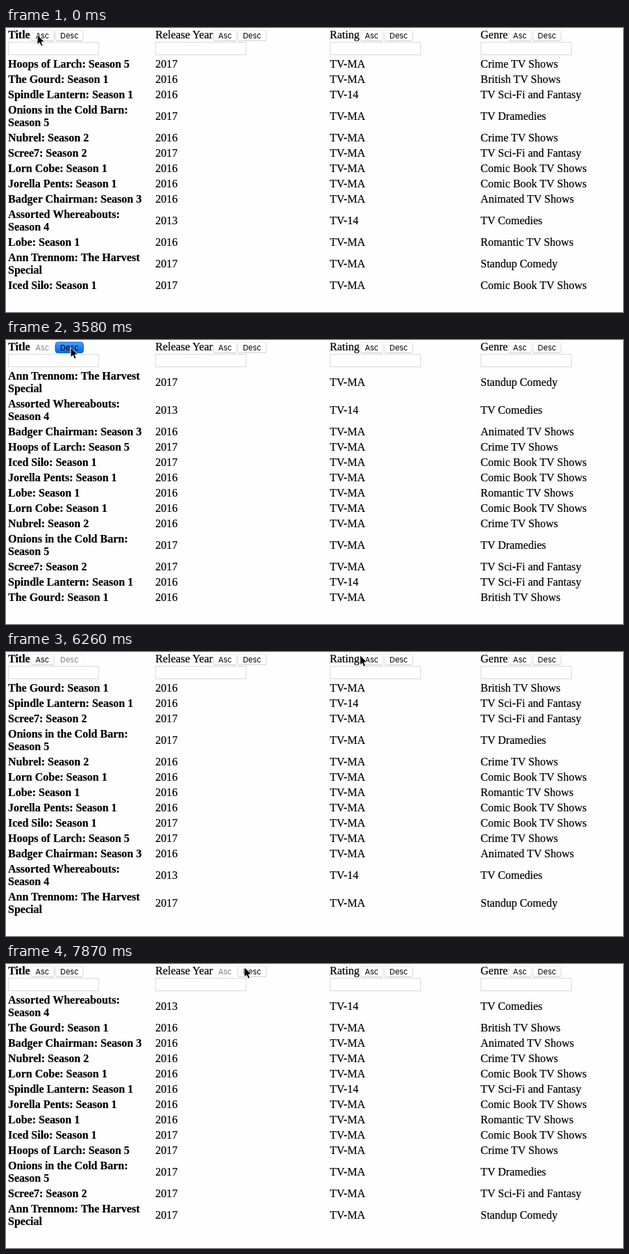
Recreate the animation shown at these times as an HTML page. Size 888 by 408 pixels, loop 8 s.

```html
<!DOCTYPE html>
<html lang="en">
<head>
<meta charset="utf-8">
<title>Sortable table</title>
<style>
  html, body { margin: 0; width: 100%; height: 100%; overflow: hidden; background: #fefefe; }
  svg { display: block; }
  text { font: 16px "Liberation Serif", "Times New Roman", serif; stroke: #000; stroke-width: 0.2px; white-space: pre; }
  .bold { font-weight: bold; }
  .button text { font: 11px Inter, "Liberation Sans", sans-serif; text-anchor: middle; stroke: none; }
  .face { fill: #fff; stroke: #e6e6e6; }
  .shadow { fill: #cdcdcd; }
  .disabled text { fill: #808080; }
  .disabled .face { fill: #fefefe; stroke: #f7f7f7; }
  .disabled .shadow { fill: none; }
  .pressed .face { fill: url(#blue); stroke: #1a6fe6; }
  .pressed .shadow { fill: #0a50c8; }
  .field { fill: #fff; stroke: #dadada; }
</style>
</head>
<body>
<svg width="888" height="408" viewBox="0 0 888 408">
  <defs>
    <linearGradient id="blue" x2="0" y2="1">
      <stop stop-color="#4c9ffa"/>
      <stop offset="1" stop-color="#0563ee"/>
    </linearGradient>
  </defs>
  <g id="header"></g>
  <g id="body"></g>
  <path id="cursor" d="M0 0V14.6L3.3 11.5L5.6 16.7L8.2 15.6L6 10.5H10.5Z" stroke="#fff"/>
</svg>
<script>
const LOOP = 8000;
const STEP = 146; // the pointer is redrawn at this interval while it moves

// "|" marks a line break in a title
const shows = [
  ["Hoops of Larch: Season 5", 2017, "TV-MA", "Crime TV Shows"],
  ["The Gourd: Season 1", 2016, "TV-MA", "British TV Shows"],
  ["Spindle Lantern: Season 1", 2016, "TV-14", "TV Sci-Fi and Fantasy"],
  ["Onions in the Cold Barn:|Season 5", 2017, "TV-MA", "TV Dramedies"],
  ["Nubrel: Season 2", 2016, "TV-MA", "Crime TV Shows"],
  ["Scree7: Season 2", 2017, "TV-MA", "TV Sci-Fi and Fantasy"],
  ["Lorn Cobe: Season 1", 2016, "TV-MA", "Comic Book TV Shows"],
  ["Jorella Pents: Season 1", 2016, "TV-MA", "Comic Book TV Shows"],
  ["Badger Chairman: Season 3", 2016, "TV-MA", "Animated TV Shows"],
  ["Assorted Whereabouts:|Season 4", 2013, "TV-14", "TV Comedies"],
  ["Lobe: Season 1", 2016, "TV-MA", "Romantic TV Shows"],
  ["Ann Trennom: The Harvest|Special", 2017, "TV-MA", "Standup Comedy"],
  ["Iced Silo: Season 1", 2017, "TV-MA", "Comic Book TV Shows"]
];

const columns = [
  { label: "Title", x: 3 },
  { label: "Release Year", x: 215 },
  { label: "Rating", x: 466 },
  { label: "Genre", x: 683 }
];

const ascending = [...shows].sort((a, b) => (a[0] < b[0] ? -1 : 1));
const descending = [...ascending].reverse();
// An unstable sort: shows of the same year come out shuffled
const byYear = [9, 1, 8, 4, 6, 2, 7, 10, 12, 0, 3, 5, 11].map(i => shows[i]);

const states = [
  { at: 0, rows: shows },
  { at: 750, rows: shows, pressed: "Title Asc" },
  { at: 900, rows: ascending, disabled: "Title Asc" },
  { at: 3580, rows: ascending, disabled: "Title Asc", pressed: "Title Desc" },
  { at: 3880, rows: descending, disabled: "Title Desc" },
  { at: 6990, rows: descending, disabled: "Title Desc", pressed: "Release Year Asc" },
  { at: 7140, rows: byYear, disabled: "Release Year Asc" }
];

const easeIn = p => p ** 1.4;
const easeOut = p => 1 - (1 - p) ** 1.6;
const smooth = p => p * p * (3 - 2 * p);

const home = { x: 45, y: 9.5 };
const moves = [
  { at: 1950, steps: 2, x: 68.5, y: 11.5, ease: smooth },
  { at: 2240, steps: 2, x: 51, y: 9.5, ease: smooth },
  { at: 2840, steps: 4, x: 93, y: 10.5, ease: smooth },
  { at: 4780, steps: 5, x: 324, y: 14, ease: easeIn },
  { at: 5510, steps: 4, x: 525, y: 4.5, ease: easeOut },
  { at: 6260, steps: 6, x: 315, y: 3.5, ease: smooth },
  { at: 7430, steps: 4, x: 343, y: 4.5, ease: smooth }
];

const byId = id => document.getElementById(id);

function add(parent, tag, attributes, content = "") {
  const node = document.createElementNS("http://www.w3.org/2000/svg", tag);
  for (const key in attributes) node.setAttribute(key, attributes[key]);
  node.textContent = content;
  return parent.appendChild(node);
}

const header = byId("header");
const buttons = {};

function addButton(name, label, x, width) {
  const group = add(header, "g", { class: "button" });
  add(group, "rect", { class: "shadow", x, y: 4, width, height: 15, rx: 4 });
  add(group, "rect", { class: "face", x: x + 0.5, y: 3, width: width - 1, height: 15, rx: 3.5 });
  add(group, "text", { x: x + width / 2, y: 15 }, label);
  buttons[name] = group;
}

columns.forEach(({ label, x }, i) => {
  const text = add(header, "text", { x, y: 15, class: i ? "" : "bold" }, label);
  const end = x + text.getComputedTextLength();
  addButton(label + " Asc", "Asc", end + 0.6, 34);
  addButton(label + " Desc", "Desc", end + 36, 41);
  add(header, "rect", { class: "field", x: x + 0.5, y: 20.5, width: 130, height: 18 });
});

function showState({ rows, disabled, pressed }) {
  for (const name in buttons) {
    const mode = name === pressed ? " pressed" : name === disabled ? " disabled" : "";
    buttons[name].setAttribute("class", "button" + mode);
  }
  const body = byId("body");
  body.replaceChildren();
  let top = 42;
  for (const [title, ...cells] of rows) {
    const lines = title.split("|");
    const height = lines.length * 18 + 2;
    lines.forEach((line, i) =>
      add(body, "text", { x: 3, y: top + 15 + i * 18, class: "bold" }, line));
    cells.forEach((cell, i) =>
      add(body, "text", { x: columns[i + 1].x, y: top + height / 2 + 5 }, cell));
    top += height + 2;
  }
}

function pointerAt(time) {
  let { x, y } = home;
  for (const move of moves) {
    if (time < move.at) break;
    const taken = Math.min(Math.floor((time - move.at) / STEP) + 1, move.steps);
    const progress = move.ease(taken / move.steps);
    x += (move.x - x) * progress;
    y += (move.y - y) * progress;
  }
  return { x, y };
}

let current;

function render(time) {
  const state = states.findLast(s => s.at <= time);
  if (state !== current) showState(current = state);
  const { x, y } = pointerAt(time);
  byId("cursor").setAttribute("transform", `translate(${x} ${y})`);
}

const start = performance.now();

function tick() {
  render((performance.now() - start) % LOOP);
  requestAnimationFrame(tick);
}
tick();
</script>
</body>
</html>
```
